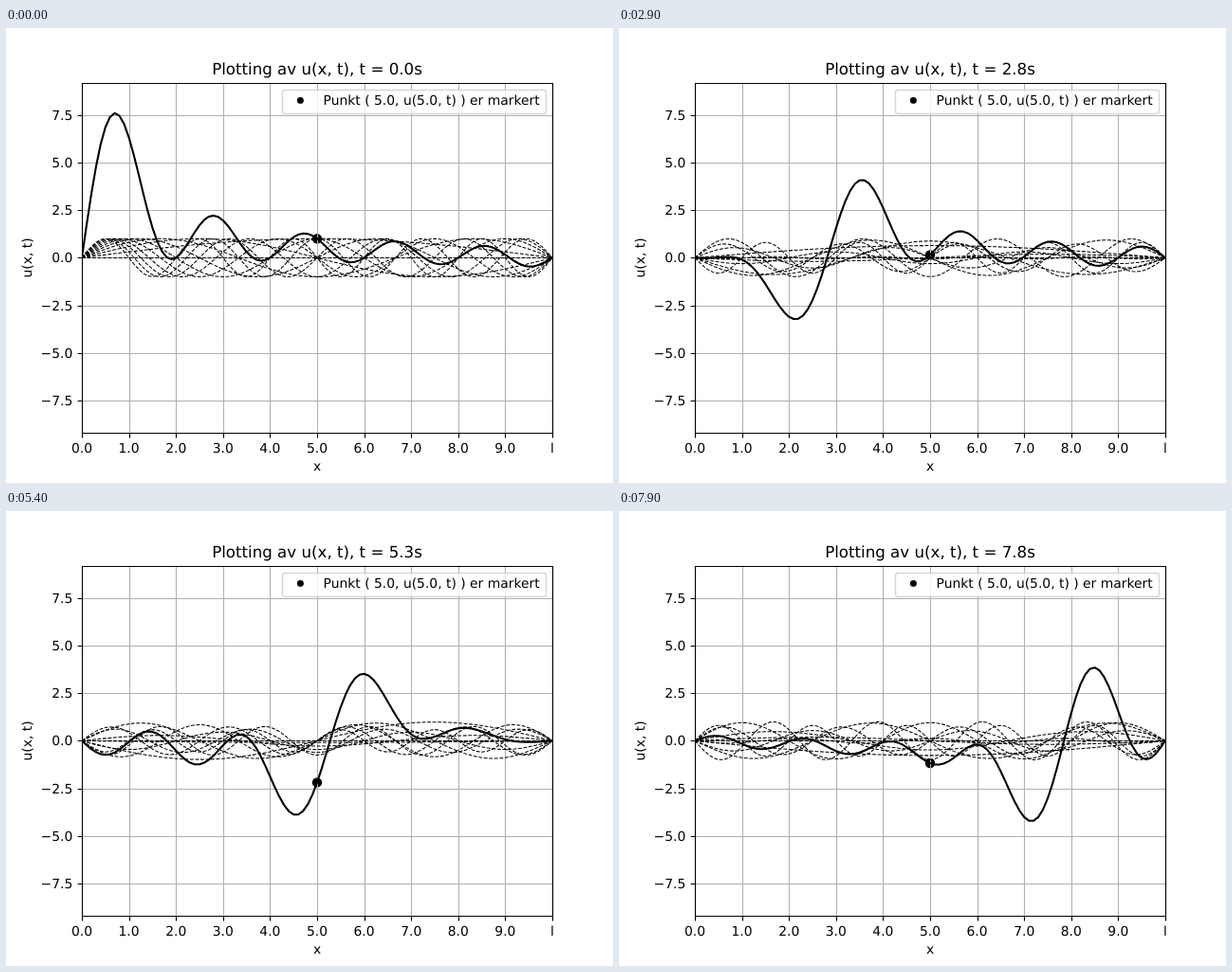
Write an HTML page that moves like this. It is 640 by 480 pixels and loops after 8 s.

```html
<!DOCTYPE html>
<html lang="no">
<head>
<meta charset="utf-8">
<title>Wave plot</title>
<style>
  html, body { margin: 0; width: 100%; height: 100%; overflow: hidden; background: #fff; }
  svg { display: block; width: 640px; height: 480px; }
  text { font: 13.889px "DejaVu Sans", sans-serif; text-rendering: geometricPrecision; }
  #title { font-size: 16.667px; }
  .mid { text-anchor: middle; }
  .end { text-anchor: end; }
  path { fill: none; stroke: #000; }
  #grid { stroke: #b0b0b0; stroke-width: 1.11; }
  #ticks, #frame { stroke-width: 1.11; }
  #modes path { stroke-width: 1.04; stroke-dasharray: 3.85 1.67; stroke-linejoin: round; }
  #sum { stroke-width: 2.083; stroke-linejoin: round; stroke-linecap: square; }
</style>
</head>
<body>
<svg viewBox="0 0 640 480">
  <clipPath id="area"><rect x="80" y="57.6" width="496" height="369.6"/></clipPath>
  <circle id="dot" r="5.2"/>
  <path id="grid"/>
  <g clip-path="url(#area)">
    <g id="modes"></g>
    <path id="sum"/>
  </g>
  <path id="ticks"/>
  <path id="frame" d="M80.5 58.5H576.5V427.5H80.5Z"/>
  <g id="labels"></g>
  <text id="title" class="mid" x="328" y="49"></text>
  <text class="mid" x="328" y="467">x</text>
  <text class="mid" transform="translate(27 242.4) rotate(-90)">u(x, t)</text>
  <rect x="291.5" y="65.5" width="278" height="25" rx="2.8"
        fill="#fff" fill-opacity=".8" stroke="#ccc" stroke-opacity=".8" stroke-width="1.39"/>
  <circle cx="310.4" cy="76.4" r="3.47"/>
  <text x="334.6" y="81">Punkt ( 5.0, u(5.0, t) ) er markert</text>
</svg>
<script>
const LENGTH = 10, MODES = 10, LOOP = 8000, STEP = 100, MARK = 5;
const el = id => document.getElementById(id);
const px = x => 80 + 49.6 * x;
const py = y => 242.4 - 20.087 * y;
const snap = v => Math.floor(v + 0.5) + 0.5;
const xs = Array.from({ length: 101 }, (_, i) => i / 10);

const mode = (n, x, t) =>
  Math.sin(n * Math.PI * x / LENGTH) * Math.cos(n * Math.PI * t / LENGTH);

function total(x, t) {
  let u = 0;
  for (let n = 1; n <= MODES; n++) u += mode(n, x, t);
  return u;
}

const curve = f =>
  'M' + xs.map(x => px(x).toFixed(2) + ' ' + py(f(x)).toFixed(2)).join('L');

function add(parent, tag, attrs, text = '') {
  const node = document.createElementNS(parent.namespaceURI, tag);
  for (const key in attrs) node.setAttribute(key, attrs[key]);
  node.textContent = text;
  return parent.appendChild(node);
}

function drawAxes() {
  let grid = '', ticks = '';
  for (let x = 0; x <= LENGTH; x++) {
    const X = snap(px(x));
    grid += `M${X} 58V427`;
    ticks += `M${X} 427.5V432.4`;
    add(el('labels'), 'text', { class: 'mid', x: px(x), y: 448 },
      x < LENGTH ? x.toFixed(1) : 'l');
  }
  for (let y = -7.5; y <= 7.5; y += 2.5) {
    const Y = snap(py(y));
    grid += `M80 ${Y}H576`;
    ticks += `M80.5 ${Y}H75.6`;
    add(el('labels'), 'text', { class: 'end', x: 70.3, y: Y + 4.9 },
      y.toFixed(1).replace('-', '\u2212'));
  }
  el('grid').setAttribute('d', grid);
  el('ticks').setAttribute('d', ticks);
}

drawAxes();
add(el('modes'), 'path', { d: 'M80 242.5H576' });
const modePaths = Array.from({ length: MODES }, () => add(el('modes'), 'path', {}));
el('dot').setAttribute('cx', px(MARK));

let shown = -1;
function draw(step) {
  const t = step / 10;
  el('title').textContent = `Plotting av u(x, t), t = ${t.toFixed(1)}s`;
  modePaths.forEach((path, i) => path.setAttribute('d', curve(x => mode(i + 1, x, t))));
  el('sum').setAttribute('d', curve(x => total(x, t)));
  el('dot').setAttribute('cy', py(total(MARK, t)));
}

const start = performance.now();
function tick() {
  const ms = (performance.now() - start) % LOOP;
  const step = Math.max(0, Math.floor(ms / STEP) - 1); // the first pose holds twice as long
  if (step !== shown) draw(shown = step);
  requestAnimationFrame(tick);
}
tick();
</script>
</body>
</html>
```
